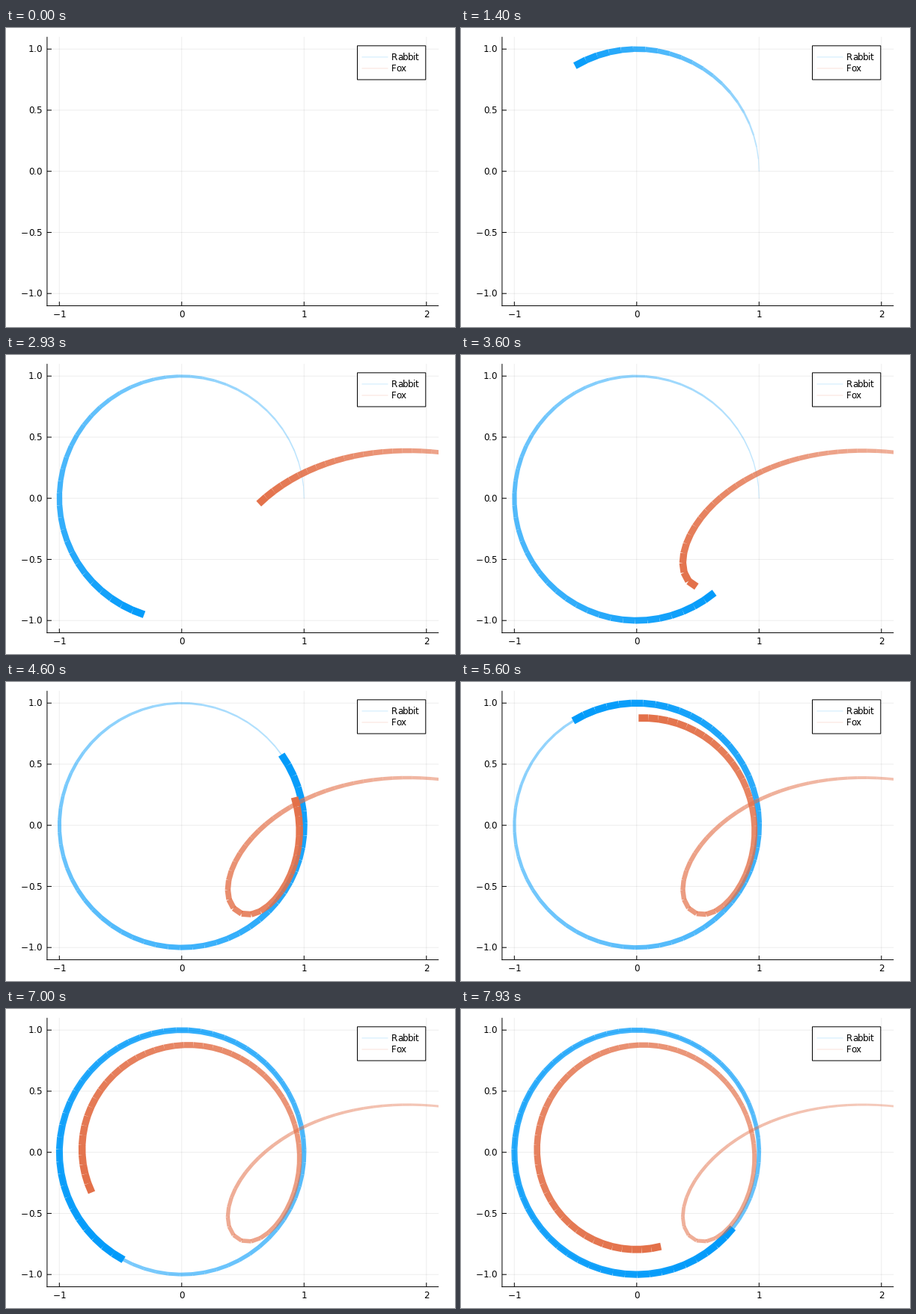
Write a matplotlib script that moves like this. It is 600 px wide and 400 px high and loops after 8000 ms.

```python
import math
import numpy as np
import matplotlib.pyplot as plt
from matplotlib.animation import FuncAnimation
from matplotlib.collections import LineCollection
from matplotlib.colors import to_rgb
from matplotlib.patches import Rectangle
from matplotlib.textpath import TextPath

W, H, DPI = 600, 400, 100
STEPS, TICKS, LOOP_MS = 120, 3, 8000        # each step lasts TICKS short frames
DT, SUBSTEPS, FOX_SPEED = 0.1, 20, 0.8
UNIT, X0, Y0 = 163.5, 234.8, 191.7          # pixels per unit, origin in pixels
LEFT, RIGHT, TOP, BOTTOM = 54.9, 578.2, 11.8, 371.6
FONT_PX = 12
BLUE, ORANGE = "#009AFA", "#E36F47"
MIN_ALPHA = 0.2


def pt(pixels):
    return pixels * 72 / DPI


def to_px(p):
    return np.column_stack([X0 + UNIT * p[:, 0], Y0 - UNIT * p[:, 1]])


def rabbit_at(t):
    return np.array([np.cos(t), np.sin(t)])


def chase(t, fox):
    gap = rabbit_at(t) - fox
    return FOX_SPEED * gap / np.hypot(*gap)


def fox_path():
    """Pursuit curve, integrated with RK4 and sampled once per step."""
    fox, h = np.array([4.0, 0.0]), DT / SUBSTEPS
    path = [fox]
    for i in range((STEPS - 1) * SUBSTEPS):
        t = i * h
        a = chase(t, fox)
        b = chase(t + h / 2, fox + a * h / 2)
        c = chase(t + h / 2, fox + b * h / 2)
        d = chase(t + h, fox + c * h)
        fox = fox + h * (a + 2 * b + 2 * c + d) / 6
        if (i + 1) % SUBSTEPS == 0:
            path.append(fox)
    return np.array(path)


fig = plt.figure(figsize=(W / DPI, H / DPI), dpi=DPI, facecolor="white")
ax = fig.add_axes([0, 0, 1, 1])
ax.set_xlim(0, W)
ax.set_ylim(H, 0)
ax.axis("off")


def line(x1, y1, x2, y2, color="black", z=3, **kw):
    ax.plot([x1, x2], [y1, y2], color=color, lw=pt(1), zorder=z,
            solid_capstyle="butt", snap=False, **kw)


def advance(char):
    """Glyph advance, cut to whole pixels."""
    one, two = (TextPath((0, 0), char * n, size=FONT_PX).get_extents().width
                for n in (1, 2))
    return math.floor(two - one + 0.01)


def label(x, y, s, align=0.0, z=3):
    """Text on baseline y; align is 0 for left, 0.5 centre, 1 right."""
    steps = [advance(c) for c in s]
    x = round(x - align * sum(steps))
    for char, step in zip(s, steps):
        ax.text(x, y, char, ha="left", va="baseline", fontsize=pt(FONT_PX),
                family="DejaVu Sans", color="black", zorder=z)
        x += step


def tick_text(value, digits):
    return f"{value:.{digits}f}".replace("-", "\u2212")


# grid, ticks and tick labels
for v in (-1, 0, 1, 2):
    x = X0 + UNIT * v
    line(x, TOP, x, BOTTOM, alpha=0.07, z=1)
    line(x, BOTTOM, x, BOTTOM - 5.5)
    label(x, 387, tick_text(v, 0), 0.5)
for v in (-1, -0.5, 0, 0.5, 1):
    y = Y0 - UNIT * v
    line(LEFT, y, RIGHT, y, alpha=0.07, z=1)
    line(LEFT, y, LEFT + 6, y)
    label(47, y + 4.2, tick_text(v, 1), 1)
line(LEFT, TOP, LEFT, BOTTOM + 0.5)
line(LEFT - 0.5, BOTTOM, RIGHT, BOTTOM)

# legend
ax.add_patch(Rectangle((469.5, 23.8), 91.3, 45.3, fc="white", ec="black",
                       lw=pt(1), zorder=5, snap=False))
for y, name, color in ((38.9, "Rabbit", BLUE), (54, "Fox", ORANGE)):
    line(475.5, y, 510.5, y, color, z=6, alpha=MIN_ALPHA)
    label(515, y + 4.2, name, z=6)

# trails
window = Rectangle((LEFT, TOP), RIGHT - LEFT, BOTTOM - TOP,
                   transform=ax.transData)
times = DT * np.arange(STEPS)
trails = []
for path, color in ((rabbit_at(times).T, BLUE), (fox_path(), ORANGE)):
    p = to_px(path)
    segments = np.stack([p[:-1], p[1:]], axis=1)
    trail = LineCollection([], capstyle="butt", zorder=2, snap=False)
    ax.add_collection(trail, autolim=False)
    trail.set_clip_path(window)
    trails.append((trail, segments, to_rgb(color)))


def draw(frame):
    k = min((frame + 1) // TICKS, STEPS - 1)
    width = np.linspace(1, 10, k + 1)[:k]
    alpha = np.linspace(MIN_ALPHA, 1, k + 1)[:k]
    for trail, segments, rgb in trails:
        trail.set_segments(segments[:k])
        if k:
            trail.set_linewidth(pt(width))
            trail.set_color([(*rgb, a) for a in alpha])
    return [t[0] for t in trails]


anim = FuncAnimation(fig, draw, frames=STEPS * TICKS,
                     init_func=lambda: draw(0),
                     interval=LOOP_MS / (STEPS * TICKS),
                     repeat=True, repeat_delay=0)
plt.show()
```
